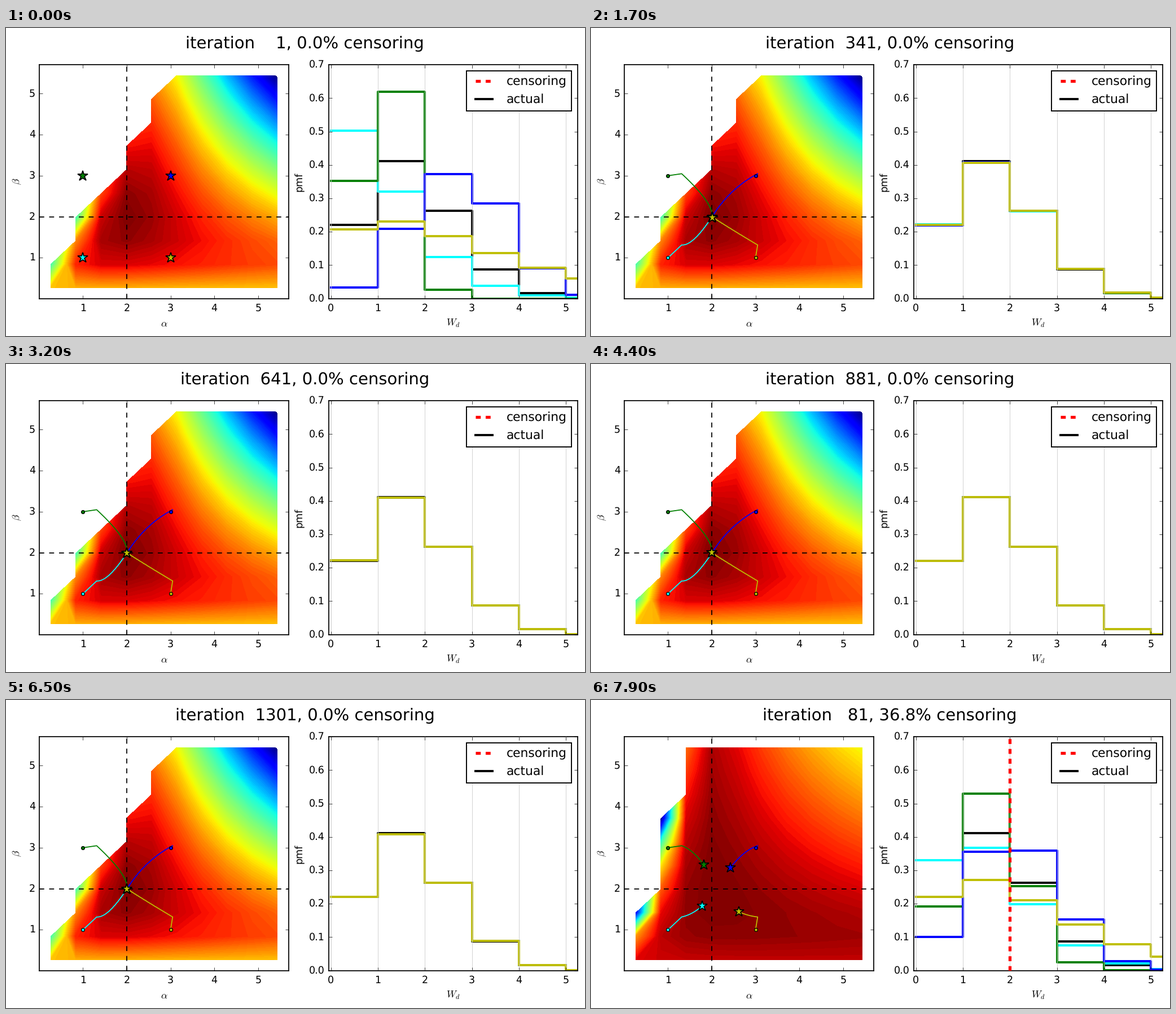
Animation of 1026 by 546 pixels, one loop 8000 ms. Source, as a matplotlib script:

```python
import numpy as np
import matplotlib.pyplot as plt
from matplotlib.animation import FuncAnimation

plt.style.use("classic")
plt.rcParams.update({
    "font.family": "DejaVu Sans", "text.hinting": "none",
    "figure.facecolor": "white", "savefig.dpi": "figure",
    "xtick.major.pad": 6, "ytick.major.pad": 5,
    "axes.linewidth": 1.2, "patch.linewidth": 1.3,
})

W, H, DPI = 1026, 546, 105
FRAMES, FIRST_RUN, STEP = 80, 75, 20
LIMITS = (0.007, 5.702)
TRUTH = (2, 2)
CENSOR, LAST = 2, 5  # censoring point and largest observed value
K = np.arange(LAST + 2)

# Start value, bend of the way to the truth, estimate after 80 censored steps
RUNS = {
    "cyan": ((1, 1), (1.57, 1.29), (1.781, 1.579)),
    "g": ((1, 3), (2.05, 2.32), (1.818, 2.586)),
    "b": ((3, 3), (2.42, 2.70), (2.43, 2.519)),
    "y": ((3, 1), (2.50, 1.66), (2.616, 1.44)),
}


def hazard(k, alpha, beta):
    return (k / alpha) ** beta


def pmf(alpha, beta):
    return np.exp(-hazard(K, alpha, beta)) - np.exp(-hazard(K + 1, alpha, beta))


def log_likelihood(alpha, beta, censor=None):
    """Expected log-likelihood of a discrete Weibull, masked where it underflows."""
    total = 0
    for k, p in enumerate(pmf(*TRUTH)[:censor]):
        low, high = hazard(k, alpha, beta), hazard(k + 1, alpha, beta)
        total = total + p * (np.log1p(-np.exp(low - high)) - low)
    if censor:
        total = total - np.exp(-hazard(censor, *TRUTH)) * hazard(censor, alpha, beta)
    underflow = hazard(censor or LAST, alpha, beta) > -np.log(np.finfo(float).eps)
    return np.ma.masked_where(underflow, total)


def column(point):
    return np.array(point, float)[:, None]


def bezier(start, bend, end, t):
    return (1 - t) ** 2 * start + 2 * t * (1 - t) * bend + t ** 2 * end


def estimate(run, steps, censored):
    """Parameters after the given numbers of steps, as rows alpha and beta."""
    init, bend, cut = map(column, run)
    start = np.log1p(np.exp(init))  # softplus keeps the parameters positive
    if censored:
        bend = start + (cut - start) * column((0.5, 0.2))
        return bezier(start, bend, cut, steps / 80)
    noise = np.array([1 + np.sin(0.37 * steps), np.sin(0.53 * steps) - 0.5])
    settled = np.minimum(steps / 300, 1)
    return bezier(start, bend, column(TRUTH), np.tanh(steps / 110)) + 0.007 * settled * noise


fig = plt.figure(figsize=((W + 0.01) / DPI, (H + 0.01) / DPI), dpi=DPI)


def panel(left, right, top=65.2, bottom=479.7):
    return fig.add_axes([left / W, 1 - bottom / H, (right - left) / W, (bottom - top) / H])


def label(x, y, text, va="center", fontsize=12, **style):
    return fig.text(x / W, 1 - y / H, text, ha="center", va=va, fontsize=fontsize, **style)


field = panel(59.3, 501.2)
bars = panel(571.6, 1013)
title = label(529.5, 36, "", va="baseline", fontsize=20)
label(280, 524, r"$\alpha$")
label(19, 272, r"$\beta$", rotation=90)
label(792, 523, "$W_d$")
label(520, 273, "pmf", rotation=90)

nodes = np.linspace(0.266, 5.434, 10)
A, B = np.meshgrid(nodes, nodes)


def surface(censor=None):
    z = log_likelihood(A, B, censor)
    return field.contourf(A, B, z, np.linspace(z.min(), z.max(), 100),
                          cmap="jet", corner_mask=True)


surfaces = [surface(), surface(CENSOR)]
field.axvline(TRUTH[0], color="k", ls="--", lw=1.2)
field.axhline(TRUTH[1], color="k", ls="--", lw=1.2)
field.set(xlim=LIMITS, ylim=LIMITS, xticks=range(1, 6), yticks=range(1, 6))

bars.set(xlim=(-0.05, 5.25), ylim=(0, 0.7), xticks=range(6), yticks=np.arange(8) / 10)
bars.grid(axis="x", ls="-", lw=0.6, color="0.8")
cut_line = bars.axvline(CENSOR, color="r", ls="--", lw=3.6, zorder=3, label="censoring")
bars.plot(K, pmf(*TRUTH), "k", lw=2.7, drawstyle="steps-post", label="actual")
bars.legend(loc="upper right", fontsize=15).set_zorder(5)

artists = []
for color, run in RUNS.items():
    trail, = field.plot([], [], color=color, lw=1.2)
    field.plot(*run[0], "o", color=color, ms=4, mec="k", mew=0.9)
    star, = field.plot([], [], "*", color=color, ms=13, mec="k", mew=1.2, zorder=4)
    step, = bars.plot([], [], color=color, lw=2.7, drawstyle="steps-post")
    artists.append((run, trail, star, step))


def draw(frame):
    censored = frame >= FIRST_RUN
    done = STEP * (frame % FIRST_RUN)
    rate = 100 * np.exp(-hazard(CENSOR, *TRUTH)) if censored else 0
    title.set_text(f"iteration  {done + 1:3d}, {rate:.1f}% censoring")
    surfaces[0].set_visible(not censored)
    surfaces[1].set_visible(censored)
    cut_line.set_visible(censored)
    for run, trail, star, step in artists:
        path = estimate(run, np.arange(0, done + 1, 5), censored)
        step.set_data(K, pmf(*path[:, -1]))
        start = column(run[0])
        path = np.hstack([start, path]) if done else start
        trail.set_data(*path)
        star.set_data(*path[:, -1:])


anim = FuncAnimation(fig, draw, frames=FRAMES, interval=100, repeat=True,
                     repeat_delay=0, init_func=lambda: draw(0))
plt.show()
```
